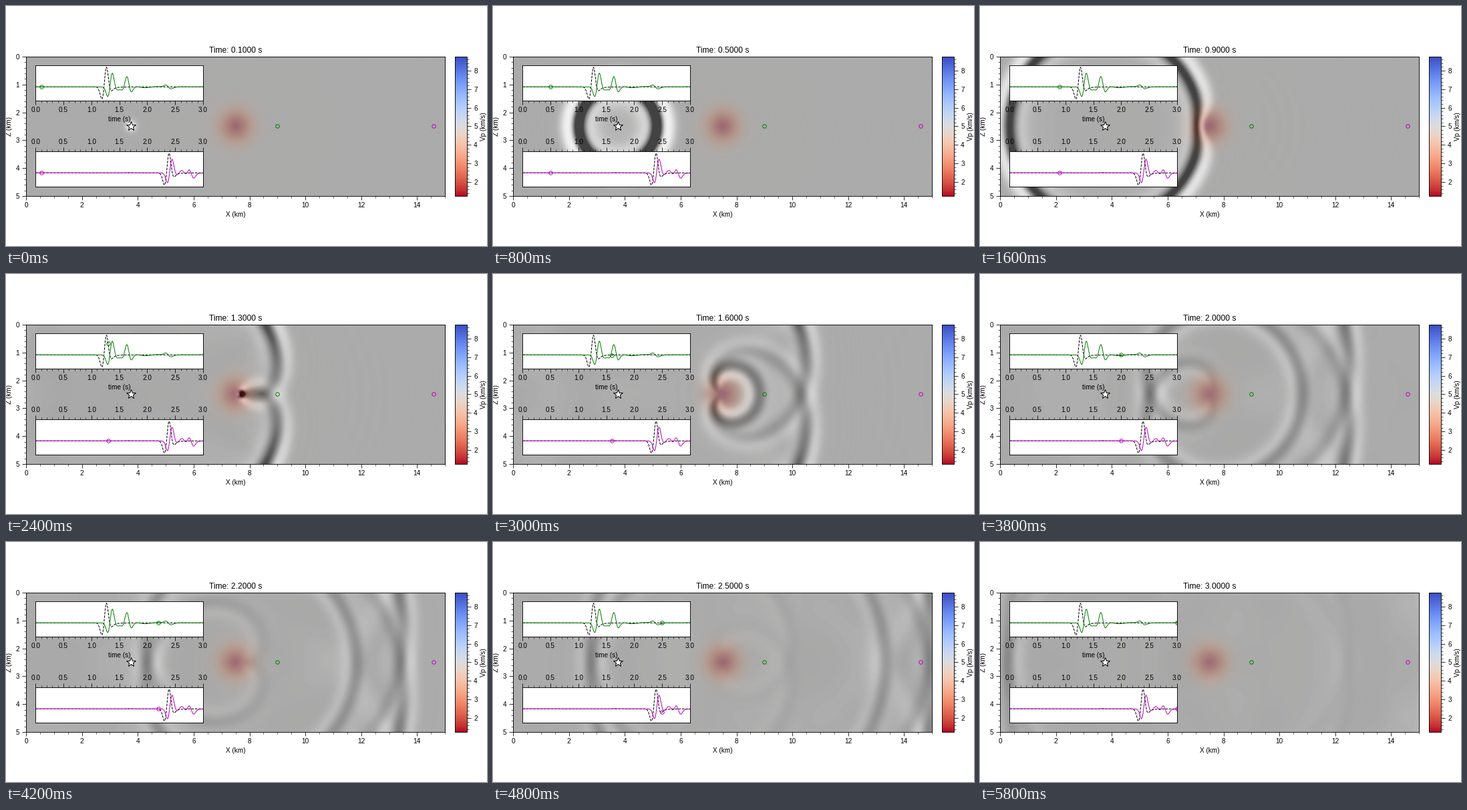
Recreate the animation shown at these times as a matplotlib script. Size 720 by 360 pixels, loop 6 s.

```python
import numpy as np
import matplotlib.pyplot as plt
from matplotlib.animation import FuncAnimation
from matplotlib.ticker import AutoMinorLocator, MultipleLocator

W, H, DPI = 720, 360, 72
C0, DIP, WIDTH = 5.0, 0.75, 0.6          # background km/s, lens depth, lens radius
FREQ = 5.0
SRC, NEAR, FAR, MID = 3.75, 9.0, 14.6, 2.5
DX, DT, STEPS, EVERY = 0.05, 0.004, 750, 25
PAD_X, PAD_Z, DAMP = 30, 40, 25

plt.rcParams.update({
    "font.family": "Liberation Sans", "font.size": 10,
    "axes.linewidth": 0.9, "axes.titlesize": 12,
    "xtick.major.size": 6, "ytick.major.size": 6,
    "xtick.minor.size": 3, "ytick.minor.size": 3,
    "xtick.major.pad": 3, "ytick.major.pad": 4,
})


def ricker(t):
    a = (np.pi * FREQ * (t - 1 / FREQ)) ** 2
    return (1 - 2 * a) * np.exp(-a)


def direct(r, t):
    """Field of a 2D point source in the uniform medium."""
    u = np.linspace(0, 3, 2000)
    s = ricker(t[:, None] - r / C0 * np.cosh(u))
    return s.sum(axis=1) * (u[1] - u[0]) / (2 * np.pi * C0 ** 2)


def velocity(x, z):
    r2 = (x - 7.5) ** 2 + (z - MID) ** 2
    return C0 * (1 - DIP * np.exp(-r2 / WIDTH ** 2))


def simulate():
    """Pseudo-spectral acoustic waves with absorbing margins."""
    x = (np.arange(360) - PAD_X) * DX
    z = ((np.arange(180) - PAD_Z) * DX)[:, None]
    edge_x = np.clip(abs(x - 7.5) - 7.5, 0, None) / (PAD_X * DX)
    edge_z = np.clip(abs(z - MID) - MID, 0, None) / (PAD_Z * DX)
    taper = np.exp(-DT * DAMP * (edge_x ** 2 + edge_z ** 2))
    kx = 2 * np.pi * np.fft.rfftfreq(x.size, DX)
    kz = 2 * np.pi * np.fft.fftfreq(z.size, DX)[:, None]
    k2 = kx ** 2 + kz ** 2
    gain = (velocity(x, z) * DT) ** 2

    def col(pos):
        return PAD_X + round(pos / DX)

    row = PAD_Z + round(MID / DX)
    p = np.zeros((z.size, x.size))
    q = p.copy()
    shots, near, far = [], [0.0], [0.0]
    for n in range(1, STEPS + 1):
        lap = np.fft.irfft2(-k2 * np.fft.rfft2(p), s=p.shape)
        new = 2 * p - q + gain * lap
        new[row, col(SRC)] += ricker((n - 1) * DT) * (DT / DX) ** 2
        p, q = new * taper, p * taper
        near.append(p[row, col(NEAR)])
        far.append(p[row, col(FAR)])
        if n % EVERY == 0:
            shots.append(p[PAD_Z:PAD_Z + 101, PAD_X:PAD_X + 301].copy())
    return shots, np.array(near), np.array(far)


time = np.arange(STEPS + 1) * DT
shots, near, far = simulate()
clip = direct(3.4, time).max() / 1.1

fig = plt.figure(figsize=(W / DPI, H / DPI), dpi=DPI, facecolor="white")


def add_axes(x, y, w, h):
    return fig.add_axes([x / W, 1 - (y + h) / H, w / W, h / H])


ax = add_axes(30, 75.9, 627.2, 209.1)
gx = np.linspace(0, 15, 301)
gz = np.linspace(0, 5, 101)[:, None]
h = DX / 2
view = dict(extent=(-h, 15 + h, 5 + h, -h), aspect="auto", interpolation="bicubic")
model = ax.imshow(velocity(gx, gz), cmap="coolwarm_r", vmin=C0 * (1 - DIP),
                  vmax=C0 * (1 + DIP), **view)
wave = ax.imshow(shots[0], cmap="Greys", vmin=-clip, vmax=clip, alpha=0.7, **view)
ax.set(xlim=(0, 15), ylim=(5, 0), xlabel="X (km)", ylabel="Z (km)")
ax.xaxis.set_major_locator(MultipleLocator(2))
ax.yaxis.set_major_locator(MultipleLocator(1))
ax.xaxis.set_minor_locator(AutoMinorLocator(4))
ax.yaxis.set_minor_locator(AutoMinorLocator(5))
ax.plot(SRC, MID, "*", ms=15, mfc="white", mec="black", mew=1)
ring = dict(marker="o", ms=5.5, mfc="none", mew=1, ls="none")
ax.plot(NEAR, MID, color="g", **ring)
ax.plot(FAR, MID, color="m", **ring)
title = ax.set_title("")

cax = add_axes(672.2, 75.9, 18, 209.1)
bar = fig.colorbar(model, cax=cax)
bar.set_label("Vp (km/s)")
bar.set_ticks(range(2, 9))
cax.yaxis.set_minor_locator(AutoMinorLocator(5))


def seismogram(y, trace, plain, color):
    a = add_axes(44.2, y, 250.9, 52.5)
    a.plot(time, plain, "k--", lw=1)
    a.plot(time, trace, color=color, lw=1)
    dot, = a.plot([0], [0], color=color, **ring)
    a.set_xlim(0, 3)
    a.set_yticks([])
    a.xaxis.set_major_locator(MultipleLocator(0.5))
    a.xaxis.set_minor_locator(AutoMinorLocator(5))
    return a, dot


plain_near = direct(NEAR - SRC, time)
plain_far = direct(FAR - SRC, time)
top, dot_near = seismogram(89.5, near, plain_near, "g")
low, dot_far = seismogram(218.5, far, plain_far, "m")
top.set_xlabel("time (s)")
low.xaxis.tick_top()


def draw(i):
    n = (i + 1) * EVERY
    wave.set_data(shots[i])
    title.set_text(f"Time: {time[n]:.4f} s")
    dot_near.set_data([time[n]], [plain_near[n]])
    dot_far.set_data([time[n]], [plain_far[n]])
    return wave, title, dot_near, dot_far


anim = FuncAnimation(fig, draw, frames=len(shots), interval=200, repeat=True)
plt.show()
```
